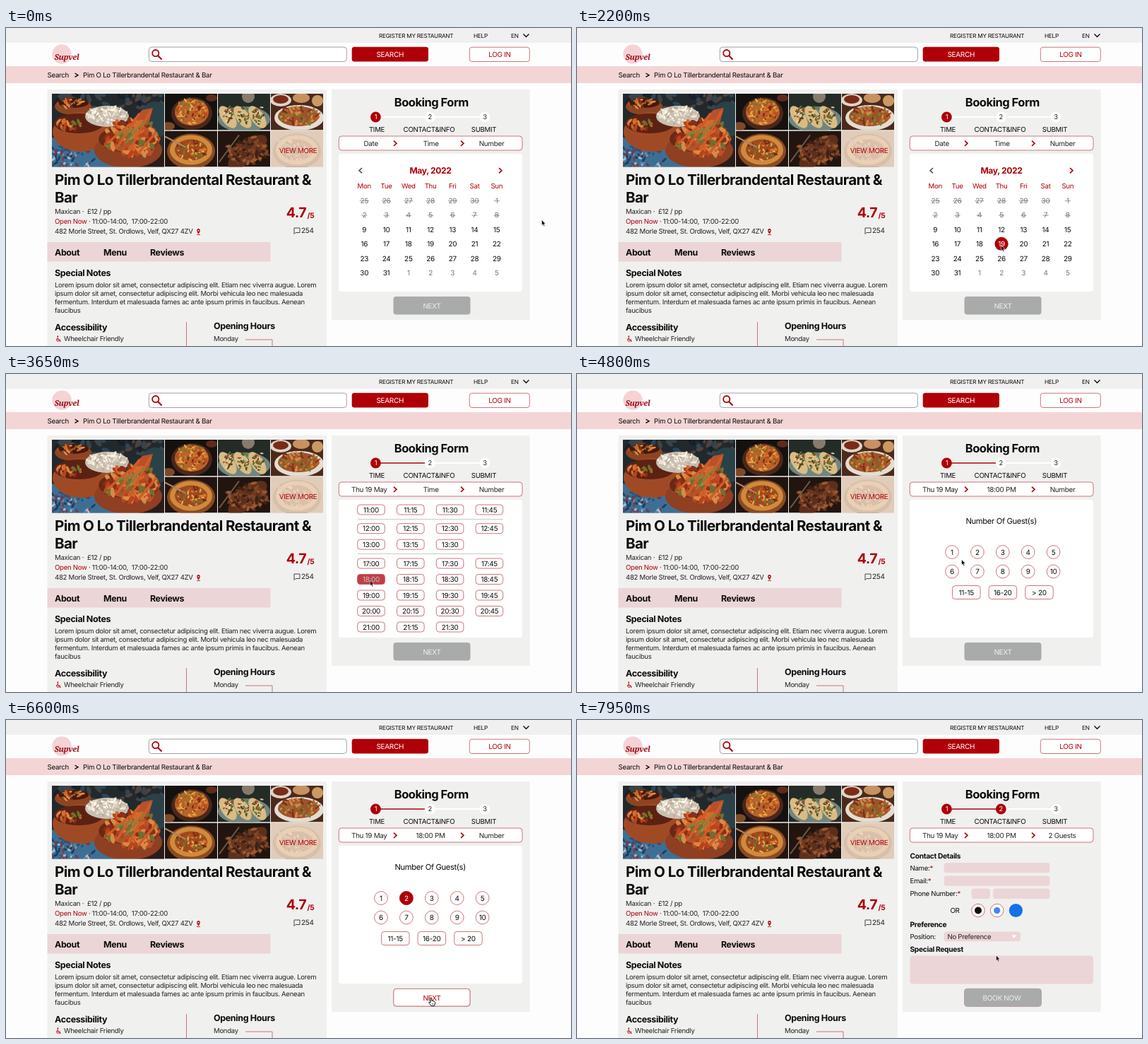
Animation of 800x450 px, one loop 8 s. Source, as an HTML page:

```html
<!DOCTYPE html>
<html lang="en">
<head>
<meta charset="utf-8">
<title>Booking form</title>
<style>
  html, body { margin: 0; width: 100%; height: 100%; overflow: hidden; background: #fdfdfd; }
  svg { display: block; }
  #stage { width: 100vw; height: 100vh; }
  text { font-family: Inter, Roboto, sans-serif; letter-spacing: -0.03em; text-rendering: geometricPrecision; }
  .script { font-family: "Noto Serif", "Liberation Serif", serif; font-style: italic; }
</style>
</head>
<body>
<svg id="stage" viewBox="0 0 800 450"></svg>
<script>
const RED = '#ad0009', EDGE = '#c2545b', INK = '#222', DARK = '#0c0c0c', GREY = '#777', PINK = '#ecd5d7', PANEL = '#f0f0ef';
const LOOP = 8000, FADE = 300;

// y is the middle of the capitals
const text = (x, y, str, size = 9.6, fill = INK, anchor = 'start', weight = 400, extra = '') =>
  `<text x="${x}" y="${y + size * 0.364}" font-size="${size}" fill="${fill}" text-anchor="${anchor}" font-weight="${weight}" ${extra}>${str}</text>`;
const mid = (x, y, str, size, fill, weight) => text(x, y, str, size, fill, 'middle', weight);
const bold = (x, y, str, size, fill = DARK) => text(x, y, str, size, fill, 'start', 650);
const rect = (x, y, w, h, fill, r = 0, stroke = 'none', sw = 0.8) =>
  `<rect x="${x}" y="${y}" width="${w}" height="${h}" rx="${r}" fill="${fill}" stroke="${stroke}" stroke-width="${sw}"/>`;
const circle = (x, y, r, fill, stroke = 'none', sw = 0.8) =>
  `<circle cx="${x}" cy="${y}" r="${r}" fill="${fill}" stroke="${stroke}" stroke-width="${sw}"/>`;
const line = (d, stroke, sw = 1, fill = 'none') =>
  `<path d="${d}" fill="${fill}" stroke="${stroke}" stroke-width="${sw}"/>`;
const layer = (id, body) => `<g id="${id}">${body}</g>`;
const list = (n, fn) => Array.from({ length: n }, (_, i) => fn(i)).join('');

// Food pictures: flat shapes with seeded specks, slightly softened
let seed = 71;
const random = () => (seed = seed * 16807 % 2147483647) / 2147483647;
const oval = (x, y, rx, ry, fill, turn = 0) =>
  `<ellipse cx="${x}" cy="${y}" rx="${rx}" ry="${ry}" fill="${fill}" transform="rotate(${turn} ${x} ${y})"/>`;
const specks = (n, x, y, rx, ry, size, colors) => list(n, () => {
  const a = random() * 6.283, d = Math.sqrt(random());
  return oval(x + Math.cos(a) * d * rx, y + Math.sin(a) * d * ry, size * (0.5 + random()), size * 0.5,
    colors[Math.floor(random() * colors.length)], random() * 180);
});
const photo = (x, y, w, h, bg, body) =>
  `<svg x="${x}" y="${y}" width="${w}" height="${h}">${rect(0, 0, w, h, bg)}<g filter="url(#soft)">${body}</g></svg>`;

function photos() {
  const food = ['#d9802b', '#b5481c', '#e8aa4c', '#7e2a13', '#6d7a2c'];
  const chilli = ['#b8431c', '#d4682a', '#8c2f18', '#6f7030', '#d98a45'];
  const pots = photo(65, 93, 159, 103.5, '#22292d',
    specks(45, 85, 8, 85, 14, 6, ['#17202a', '#3c4346', '#52413b', '#2d4557']) +
    line('M0 62 60 75 105 110H0Z', 'none', 0, '#3d6f94') +
    specks(80, 20, 92, 40, 18, 3, ['#28537c', '#a9bcc8', '#7a3b4a', '#1f3d60', '#5b8caf']) +
    line('M100 96 159 80V104H100Z', 'none', 0, '#2a1c1a') +
    oval(30, 18, 26, 12, '#8d4423') + oval(30, 13, 22, 7, '#45180f') +
    specks(25, 28, 14, 20, 7, 3, chilli) +
    oval(146, 37, 22, 26, '#2a4148') +
    oval(42, 54, 41, 28, '#a04a25') + oval(38, 42, 35, 14, '#5b2213') +
    specks(30, 24, 44, 19, 9, 3.5, chilli) +
    oval(78, 32, 31, 15, '#c9bfb0') +
    specks(90, 78, 30, 29, 13, 2.6, ['#eee6d6', '#d7cec0', '#fff8e8', '#b9a997']) +
    oval(108, 80, 48, 25, '#8f3f22') + oval(110, 64, 44, 19, '#6a2815') +
    line('M72 74 104 47 128 23 143 20 137 42 154 64 140 88 106 84Z', 'none', 0, '#b9502a') +
    specks(110, 113, 62, 38, 25, 6, chilli) +
    line('M78 70 112 42 M92 76 124 28 M110 80 140 24 M124 82 148 54', '#cf5c28', 3.5) +
    line('M90 58 116 50 M104 70 130 40', '#7d8440', 2.5));
  const plate = photo(225, 93, 74, 51.5, '#15110f',
    oval(38, 28, 29, 23, '#4a271a') + oval(38, 26, 24, 19, '#b9632b') +
    specks(90, 38, 25, 23, 18, 2.6, food) + oval(5, 46, 9, 6, '#7d4929') + oval(66, 6, 8, 5, '#5c2b1c'));
  const tacos = photo(300, 93, 74, 51.5, '#252b27',
    circle(43, 4, 9, '#877b6d') + oval(37, 36, 37, 18, '#71857f') +
    [14, 35, 56].map(x => oval(x, 33, 9, 18, '#d9bb84', -35) +
      specks(30, x + 2, 30, 8, 13, 2.2, ['#63752d', '#a04a2c', '#e2d2a8', '#5a3d22', '#3f4a22'])).join(''));
  const dishes = photo(375, 93, 74, 51.5, '#4b2a1c',
    oval(14, 9, 15, 9, '#ded5c7') + oval(14, 8, 11, 6, '#792c18') + oval(43, 6, 12, 7, '#c69262') +
    oval(40, 34, 35, 18, '#e5dcd0') + oval(39, 32, 29, 14, '#a0522a') +
    specks(80, 39, 31, 29, 14, 2.8, ['#70842d', '#b9602a', '#c98f48', '#7b321b']) + circle(66, 10, 8, '#c99a63'));
  const bowl = (x, bg) => photo(x, 145.5, 74, 51, bg,
    oval(37, 29, 34, 25, '#8a4a22') + oval(37, 27, 30, 21, '#d08a3c') + oval(37, 27, 23, 15, '#9c4a20') +
    specks(60, 37, 27, 22, 14, 2.5, food) + line('M0 8 29 23', '#a98465', 2));
  const grill = photo(300, 145.5, 74, 51, '#22150f',
    oval(42, 30, 34, 14, '#5c2f1c', -40) +
    specks(75, 42, 28, 28, 20, 4, ['#6f381f', '#9c5a30', '#3d2116', '#7f4527']) + line('M2 44 30 6', '#6d5a4a', 2));
  return '<filter id="soft"><feGaussianBlur stdDeviation=".5"/></filter>' +
    pots + plate + tacos + dishes + bowl(225, '#22140f') + grill + bowl(375, '#b27950') +
    rect(375, 145.5, 74, 51, 'rgba(244,236,226,.72)') + text(386.7, 173, 'VIEW MORE', 9.8, RED);
}

function header() {
  return rect(0, 0, 800, 21, '#f0f0f0') +
    text(528, 11, 'REGISTER MY RESTAURANT', 8.2, DARK) + text(662, 11, 'HELP', 8.2, DARK) + text(715, 11, 'EN', 8.2, DARK) +
    line('M732.5 8.5 736.5 12.5 740.5 8.5', DARK, 1.4) +
    circle(79, 37, 13.7, '#f5d3d5') +
    text(68.5, 40.5, 'Supvel', 11, '#9b0c16', 'start', 700, 'class="script"') +
    rect(202.3, 27, 280, 20.5, '#fff', 4, '#8a8a8a') +
    circle(211.8, 35.6, 4.6, 'none', RED, 1.8) + line('M215 39 220.5 44.5', RED, 2.1) +
    rect(489.7, 26.7, 108.3, 20.8, '#b00007', 3.5) + mid(543.8, 37.3, 'SEARCH', 10, '#fff') +
    rect(656.3, 27.2, 85, 20.3, '#fff', 3.5, EDGE) + mid(699, 37.6, 'LOG IN', 9.9, RED) +
    rect(0, 54, 800, 24, '#f3d5d6') + text(58.5, 66.5, 'Search', 9.7, DARK) +
    line('M97.5 64 102 66.7 97.5 69.4', DARK, 1.4) +
    text(109, 66.5, 'Pim O Lo Tillerbrandental Restaurant &amp; Bar', 9.7, DARK);
}

function details() {
  const notes = [
    'Lorem ipsum dolor sit amet, consectetur adipiscing elit. Etiam nec viverra augue. Lorem',
    'ipsum dolor sit amet, consectetur adipiscing elit. Morbi vehicula leo nec malesuada',
    'fermentum. Interdum et malesuada fames ac ante ipsum primis in faucibus. Aenean',
    'faucibus'];
  return rect(58.5, 87, 395.5, 370, PANEL) + photos() +
    bold(69, 214.5, 'Pim O Lo Tillerbrandental Restaurant &amp;', 20.6) + bold(69, 239.5, 'Bar', 20.6) +
    text(69, 260, 'Maxican ·\u00a0 £12 / pp') +
    text(69, 274, `<tspan fill="${RED}">Open Now</tspan> · 11:00-14:00,\u00a0 17:00-22:00`) +
    text(69, 288, '482 Morle Street, St. Ordlows, Velf, QX27 4ZV') +
    line('M272.5 291.5C269.5 288 269.5 284 272.5 284S275.5 288 272.5 291.5Z', 'none', 0, RED) +
    circle(272.5, 286.8, 1, PANEL) + line('M270 292.5H275', RED, 0.8) +
    bold(396.7, 261, '4.7', 19.6, RED) + bold(426.6, 265, '/5', 10.4, RED) +
    line('M408 283H416V289.5H410L408 291.5Z', '#333', 0.9) + text(418, 286.5, '254', 10) +
    rect(58.5, 303, 316, 27.5, PINK) +
    bold(69, 317, 'About', 12.4) + bold(138, 317, 'Menu', 12.4) + bold(204, 317, 'Reviews', 12.4) +
    bold(69, 346, 'Special Notes', 12.5) + notes.map((s, i) => text(69, 363.4 + i * 12.1, s, 9.57)).join('') +
    bold(69, 423, 'Accessibility', 12.5) + bold(294, 421.5, 'Opening Hours', 12.5) +
    circle(73.3, 436.4, 1, RED) + line('M73.3 438V441H76L77 444', RED, 1.1) +
    line('M72 439.5A2.3 2.3 0 1 0 75.5 442.5', RED, 0.9) +
    text(82, 440, 'Wheelchair Friendly') + text(294, 440, 'Monday') +
    line('M255.5 416V450 M339 441H377V450', EDGE, 0.8);
}

const chevron = (x, y, color, dir = 1) => line(`M${x - 2 * dir} ${y - 3.6} ${x + 2 * dir} ${y} ${x - 2 * dir} ${y + 3.6}`, color, 1.6);
const step = (x, n, on) => circle(x, 126, 7.4, on ? RED : '#fff') + mid(x, 126, n, 9.4, on ? '#fff' : INK);
const button = (label, on) => on
  ? rect(548.8, 380.3, 108.2, 24.7, '#fff', 4, EDGE) + mid(603, 393, label, 10, RED)
  : rect(548.5, 380, 109, 25.5, '#a9abaa', 4) + mid(603 - (label === 'NEXT' ? 0 : 1.5), 393, label, 10, '#eee');

function calendar() {
  const days = ['Mon', 'Tue', 'Wed', 'Thu', 'Fri', 'Sat', 'Sun'];
  const col = i => 507.3 + i * 31.25, row = i => 244.2 + i * 20.42;
  return mid(601, 202, 'May, 2022', 12.1, RED, 650) + chevron(502, 201.7, '#555', -1) + chevron(700, 201.7, RED) +
    days.map((d, i) => mid(col(i), 223.5, d, 9.7, RED)).join('') +
    list(42, i => {
      const n = i - 5, x = col(i % 7), y = row(Math.floor(i / 7));
      const label = n < 1 ? n + 30 : n > 31 ? n - 31 : n;
      const w = label > 9 ? 6.5 : 4;
      return mid(x, y, label, 10, n < 9 || n > 31 ? GREY : DARK) +
        (n < 9 ? line(`M${x - w} ${y + 0.5}H${x + w}`, GREY, 0.8) : '');
    }) +
    layer('dayPick', circle(col(3), row(3), 9.6, RED) + mid(col(3), row(3), 19, 10, '#fff'));
}

function times() {
  const hours = [[11, 192, 4], [12, 218.7, 4], [13, 241.2, 3], [17, 268, 4], [18, 290.5, 4], [19, 313, 4], [20, 335.5, 4], [21, 358, 3]];
  const chip = (x, y, label, fill, ink) => rect(x - 19.3, y - 7, 38.6, 14, fill, 4, EDGE) + mid(x, y, label, 9.9, ink);
  return line('M498 205.5H704 M498 254.5H704', '#c9c9c9') +
    hours.map(([h, y, n]) => list(n, i => chip(517 + i * 55.8, y, `${h}:${i ? i * 15 : '00'}`, '#fff', DARK))).join('') +
    layer('timePick', chip(517, 290.5, '18:00', RED, '#fff'));
}

function guests() {
  const spot = (n, on) => {
    const x = 531 + (n - 1) % 5 * 35.9, y = n > 5 ? 279.5 : 252;
    return circle(x, y, 9.4, on ? RED : '#fff', on ? RED : EDGE) + mid(x, y, n, 10, on ? '#fff' : DARK);
  };
  return mid(600.7, 208, 'Number Of Guest(s)', 11.2, DARK) + list(10, i => spot(i + 1)) +
    ['11-15', '16-20', '&gt; 20'].map((s, i) => rect(531.5 + i * 51.6, 299.5, 39.5, 19, '#fff', 4, EDGE) +
      mid(551.2 + i * 51.6, 309, s, 10, DARK)).join('') +
    layer('guestPick', spot(2, true));
}

function contact() {
  const field = (x, y, w, h = 14.3) => rect(x, y, w, h, PINK, 4);
  const label = (y, s) => text(471.5, y, `${s}:<tspan fill="${RED}">*</tspan>`, 9.6, DARK);
  return rect(470, 177, 262, 198, PANEL) +
    bold(471.5, 191.8, 'Contact Details', 10.2) +
    label(209.3, 'Name') + field(519.5, 202, 150) +
    label(227.6, 'Email') + field(519.5, 220.5, 150) +
    label(245.8, 'Phone Number') + field(558.5, 238.6, 26.5) + field(589, 238.6, 80.5) +
    mid(535, 269.2, 'OR', 9.8, DARK) +
    circle(568, 269.5, 9.3, '#fff', EDGE) + circle(568, 269.5, 5, '#111') +
    circle(594.7, 269.5, 9.3, '#fff', EDGE) + circle(594.7, 269.5, 4.6, '#4285f4') +
    circle(621.4, 269.5, 9.6, '#1670e8') +
    bold(471.5, 289.4, 'Preference', 10.2) + text(471.5, 307, 'Position:', 9.6, DARK) +
    field(519.5, 299.5, 108.5, 13.8) + text(524.5, 306.7, 'No Preference') +
    line('M615.5 304.5H622L618.8 308.8Z', 'none', 0, '#fff') +
    bold(471.5, 324, 'Special Request', 10.2) + field(471.5, 333.6, 259.5, 40);
}

function booking() {
  return rect(461, 87, 280.5, 326, PANEL) + mid(602.3, 105.3, 'Booking Form', 16.5, DARK, 650) +
    line('M524 126H678', '#fff', 2) + layer('progress', line('M524 126H600', RED, 1.7)) +
    step(523.4, 1, true) + step(600.3, 2) + step(678, 3) + layer('stepTwo', step(600.3, 2, true)) +
    mid(525, 143.2, 'TIME', 9.6, DARK) + mid(599, 143.2, 'CONTACT&amp;INFO', 9.75, DARK) + mid(676.5, 143.2, 'SUBMIT', 9.6, DARK) +
    rect(471.3, 153, 259.7, 20, '#fff', 4, EDGE) + chevron(551, 163.3, RED) + chevron(646, 163.3, RED) +
    layer('dateEmpty', mid(516.7, 163.3, 'Date', 9.9)) + layer('dateSet', mid(514.3, 163.3, 'Thu 19 May', 9.9)) +
    layer('timeEmpty', mid(601.7, 163.3, 'Time', 9.9)) + layer('timeSet', mid(601, 163.3, '18:00 PM', 9.9)) +
    layer('countEmpty', mid(687.5, 163.3, 'Number', 9.9)) + layer('countSet', mid(687, 163.3, '2 Guests', 9.9)) +
    rect(471, 178, 260, 195, '#fff', 4) +
    layer('calendar', calendar()) + layer('times', times()) + layer('guests', guests()) + layer('contact', contact()) +
    button('NEXT') + layer('nextOn', button('NEXT', true)) + layer('bookNow', button('BOOK NOW'));
}

const cursor = layer('cursor',
  layer('arrow', '<path d="M0 0V7.8L1.7 6.2 3 9 4.3 8.4 3.1 5.7H5.4Z" fill="#000" stroke="#fff" stroke-width=".6"/>') +
  layer('hand', '<path d="M-.9-2.5Q0-3.8.9-2.5V1.2L5 2.4Q6 3 5.6 5L4.6 8.5H0L-3.2 4Q-3.3 2.6-2 3L-.9 4Z" fill="#fff" stroke="#000" stroke-width=".9"/>' +
    line('M1.6 4.5V7 M3.2 4.5V7', '#000', 0.5)));

const stage = document.getElementById('stage');
stage.innerHTML = header() + details() + booking() + cursor;
const parts = Object.fromEntries([...stage.querySelectorAll('g[id]')].map(g => [g.id, g]));

const clamp = v => Math.min(1, Math.max(0, v));
const fadeIn = (t, start) => 1 - (1 - clamp((t - start) / FADE)) ** 2;
const show = (id, a) => {
  parts[id].setAttribute('opacity', a);
  parts[id].setAttribute('display', a > 0 ? 'inline' : 'none');
};

// time, x, y
const path = [
  [100, 758.5, 271.5], [850, 600.5, 307.5], [2550, 600.5, 307.5], [3250, 515.5, 292],
  [4350, 515.5, 292], [4800, 544.5, 262.5], [5200, 567, 252.5], [6100, 567, 252.5],
  [6500, 602, 396], [7150, 602, 396], [7850, 593.5, 333]];
const handTimes = [[750, 1850], [3200, 3500], [5100, 5750], [6400, 6900]];

function moveCursor(t) {
  const next = path.findIndex(p => p[0] > t);
  const to = path.at(next), from = next > 0 ? path[next - 1] : to;
  const u = clamp((t - from[0]) / (to[0] - from[0] || 1)), e = u * u * (3 - 2 * u);
  const [x, y] = [1, 2].map(k => from[k] + (to[k] - from[k]) * e);
  parts.cursor.setAttribute('transform', `translate(${x} ${y})`);
  const hand = handTimes.some(([a, b]) => t >= a && t < b);
  show('hand', +hand);
  show('arrow', +!hand);
}

function draw(t) {
  const toTimes = fadeIn(t, 2500), toGuests = fadeIn(t, 4100), toContact = fadeIn(t, 6950);
  show('dayPick', fadeIn(t, 1850));
  show('timePick', fadeIn(t, 3500));
  show('guestPick', fadeIn(t, 5750));
  show('nextOn', fadeIn(t, 5750));
  show('calendar', 1 - toTimes);
  show('times', toTimes * (1 - toGuests));
  show('guests', toGuests * (1 - toContact));
  ['contact', 'stepTwo', 'bookNow', 'countSet'].forEach(id => show(id, toContact));
  ['progress', 'dateSet'].forEach(id => show(id, toTimes));
  show('timeSet', toGuests);
  show('dateEmpty', 1 - toTimes);
  show('timeEmpty', 1 - toGuests);
  show('countEmpty', 1 - toContact);
  moveCursor(t);
}

function tick() {
  draw(performance.now() % LOOP);
  requestAnimationFrame(tick);
}
tick();
</script>
</body>
</html>
```
